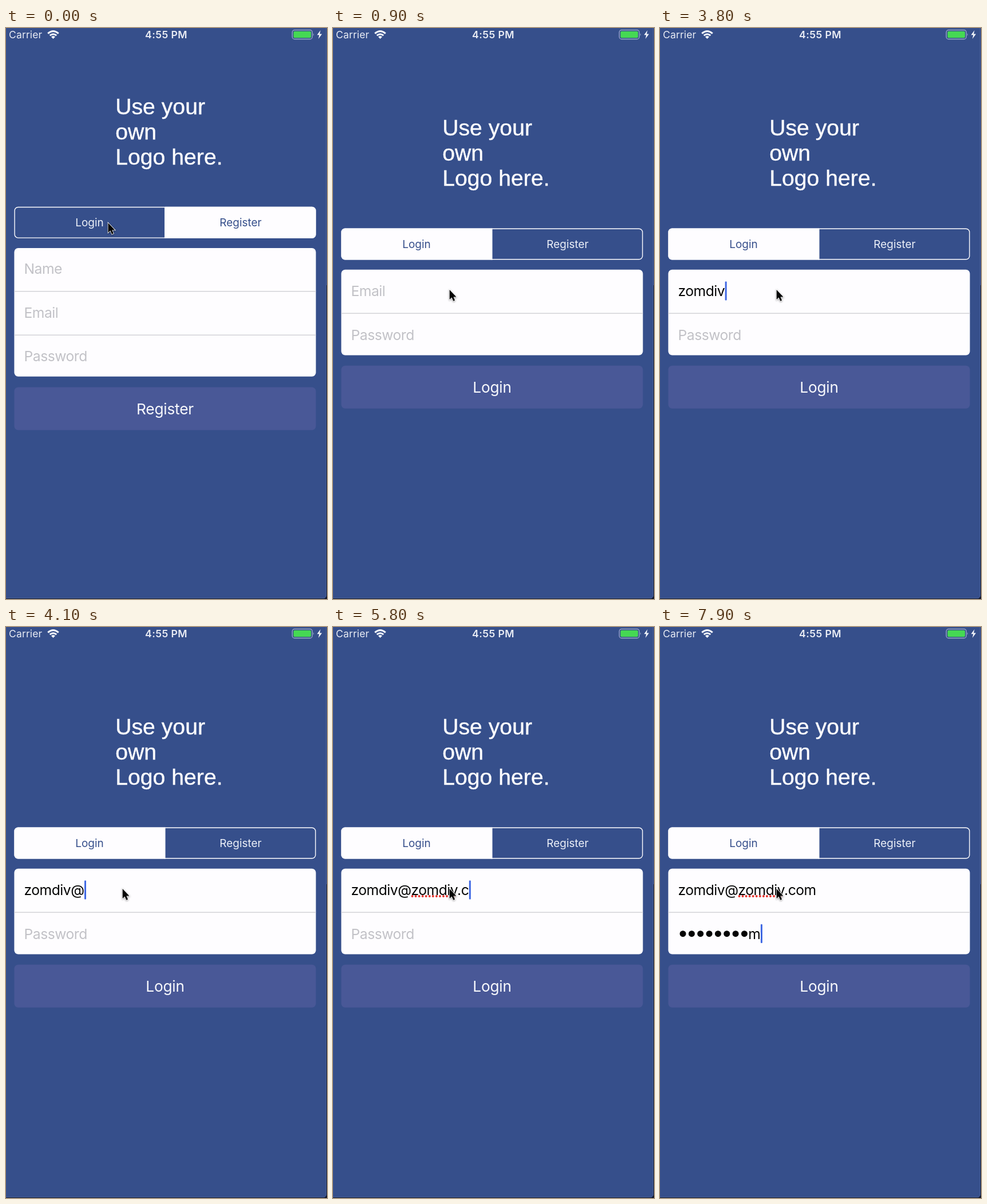
An HTML page that plays this animation: 561 by 999 pixels, repeating every 8000 ms.

```html
<!DOCTYPE html>
<html lang="en">
<head>
<meta charset="utf-8">
<title>Login form</title>
<style>
  html, body { margin: 0; width: 100%; height: 100%; overflow: hidden; background: #364f8b; }
  svg { display: block; width: 100%; height: 100%; }
  text { font-family: Inter, "Liberation Sans", sans-serif; white-space: pre; }
  .logo { font: 39.2px "Liberation Sans", Arial, sans-serif; fill: #fdfdff; stroke: #fdfdff; stroke-width: .4; }
  .bar { fill: #e9ecf4; }
  .seg { font-size: 19px; text-anchor: middle; }
  .field { font-size: 24.7px; letter-spacing: -.5px; fill: #c2c2c7; }
  .typed { fill: #050505; }
  .action { font-size: 26.3px; letter-spacing: -.25px; text-anchor: middle; fill: #f7f8fc; }
  .card { fill: #fefdff; }
  .rule { stroke: #d3d3d7; stroke-width: 1.6; }
  .button { fill: #495897; }
  .caret { fill: #4069e4; }
  .spell { stroke: #e5342f; stroke-width: 4; stroke-linecap: round; stroke-dasharray: 0 6.05; }
</style>
</head>
<body>
<svg viewBox="0 0 561 999">
  <defs>
    <clipPath id="round"><rect x="14.4" y="312.8" width="527.2" height="55" rx="6.5"/></clipPath>
  </defs>
  <rect width="561" height="999" fill="#364f8b"/>

  <!-- window edge -->
  <path d="M560.5 0V450" stroke="#2f4376"/>
  <path d="M560.5 450V999M0 998.5H561" stroke="#10172b"/>
  <path d="M559.5 0V992Q559.5 997.5 554 997.5H0" fill="none" stroke="#4a629a"/>
  <path d="M561 991V999H553Q560 998 561 991Z" fill="#10172b"/>

  <!-- status bar -->
  <text class="bar" x="5" y="18" font-size="17.5" letter-spacing=".15">Carrier</text>
  <g fill="none" stroke="#f4f6fb" stroke-width="3">
    <path d="M73.2 9.6Q82.5 1.4 91.8 9.6"/>
    <path d="M76.7 13.2Q82.5 8.3 88.3 13.2"/>
  </g>
  <path d="M79 15.4Q82.5 12.6 86 15.4L82.5 19Z" fill="#f4f6fb"/>
  <text class="bar" x="280" y="18" font-size="17.7" font-weight="600" letter-spacing=".4" text-anchor="middle">4:55 PM</text>
  <rect x="500.3" y="3.5" width="35" height="16" rx="4" fill="none" stroke="#98a6c8" stroke-width="1.3"/>
  <rect x="502.5" y="5.7" width="30.6" height="11.6" rx="2" fill="#45d853"/>
  <path d="M536.8 9Q539 11.5 536.8 14Z" fill="#98a6c8"/>
  <path d="M549.6 4L543.6 12.3H547.4L546 19L552.2 10.5H548.3Z" fill="#f4f6fb"/>

  <g id="top">
    <text class="logo" x="191.2" y="150.5">Use your</text>
    <text class="logo" x="191.2" y="194.5">own</text>
    <text class="logo" x="191.2" y="238.5">Logo here.</text>
    <g clip-path="url(#round)" fill="#fefdff">
      <rect id="loginFill" x="14" y="312" width="264" height="57"/>
      <rect id="registerFill" x="278" y="312" width="264" height="57"/>
    </g>
    <path d="M277.8 313V368" stroke="#fefdff" stroke-width="1.5"/>
    <rect x="15.1" y="313.5" width="525.8" height="53.6" rx="6" fill="none" stroke="#fefdff" stroke-width="1.4"/>
    <text id="loginTab" class="seg" x="146" y="347">Login</text>
    <text id="registerTab" class="seg" x="410" y="347">Register</text>
  </g>

  <g id="registerForm">
    <rect class="card" x="14.4" y="385" width="527.2" height="224.8" rx="7"/>
    <path class="rule" d="M14.4 460.8H541.6M14.4 537.3H541.6"/>
    <text class="field" x="31.5" y="430">Name</text>
    <text class="field" x="31.5" y="506.5">Email</text>
    <text class="field" x="31.5" y="583">Password</text>
    <rect class="button" x="14.4" y="628.5" width="527.2" height="75" rx="7"/>
    <text class="action" x="278" y="675.5">Register</text>
  </g>

  <g id="loginForm">
    <rect class="card" x="14.4" y="422.7" width="527.2" height="149.8" rx="7"/>
    <path class="rule" d="M14.4 499.3H541.6"/>
    <text id="email" class="field" x="31.5" y="469"></text>
    <path id="spell" class="spell"/>
    <g id="bullets"></g>
    <text id="password" class="field" y="545.5"></text>
    <rect id="caret" class="caret" width="3" height="33" rx="1"/>
    <rect class="button" x="14.4" y="590.7" width="527.2" height="75" rx="7"/>
    <text class="action" x="278" y="638">Login</text>
  </g>

  <path id="pointer" d="M0 0V17L3.9 13.5L6.6 19.8L9.4 18.6L6.8 12.5H11.8Z" fill="#050505" stroke="#fff" stroke-width="1.6"
        paint-order="stroke" style="filter: drop-shadow(0 1.5px 1.5px rgba(0,0,0,.4))"/>
</svg>

<script>
const LOOP = 8000, STEP = 100, LEFT = 31.5, PITCH = 15.35;
const SWITCH = 300, FOCUS = 1000, NEXT_FIELD = 6400, SPELL = 5500;
const MAIL_START = 7, MAIL_END = 13;
const $ = id => document.getElementById(id);

// [time, key]; '<' deletes one character
const emailKeys = [
  [1800, 'z'], [2000, 'o'], [2300, 'm'], [2600, 'i'], [2900, '<'], [3100, 'd'], [3300, 'i'],
  [3400, 'v'], [4000, '@'], [4300, 'z'], [4500, 'o'], [4700, 'm'], [4800, 'd'], [5000, 'i'],
  [5100, 'v'], [5500, '.'], [5800, 'c'], [6000, 'o'], [6100, 'm']
];
const passwordKeys = [
  [6700, 'z'], [6900, 'o'], [7000, 'm'], [7200, 'd'], [7300, 'i'], [7500, 'v'],
  [7800, 'z'], [7800, 'o'], [7900, 'm']
];

// [time, value] stops, joined by straight lines
const loginFade = [[0, 0], [200, .2], [300, .21], [600, 1]];
const loginInk = [[0, 0], [300, .4], [600, 1]];
const registerFade = [[200, 1], [300, .88], [600, 0]];

const typed = (keys, t) => keys.reduce((s, [at, k]) =>
  at > t ? s : k === '<' ? s.slice(0, -1) : s + k, '');

function track(stops, t) {
  const i = stops.findIndex(s => s[0] > t);
  if (i < 0) return stops[stops.length - 1][1];
  if (i === 0) return stops[0][1];
  const [t0, a] = stops[i - 1], [t1, b] = stops[i];
  return a + (b - a) * (t - t0) / (t1 - t0);
}

function smooth(t, from, to) {
  const p = Math.min(1, Math.max(0, (t - from) / (to - from)));
  return p * p * (3 - 2 * p);
}

// near white on the page colour, blue on a filled tab
const ink = p => `rgb(${[[236, 54], [240, 79], [248, 139]]
  .map(([a, b]) => Math.round(a + (b - a) * p)).join()})`;

const show = (id, on) => $(id).style.display = on ? '' : 'none';

function setField(id, text, hint) {
  $(id).textContent = text || hint;
  $(id).classList.toggle('typed', !!text);
}

function drawTabs(t) {
  $('loginFill').style.opacity = track(loginFade, t);
  $('registerFill').style.opacity = track(registerFade, t);
  $('loginTab').style.fill = ink(track(loginInk, t));
  $('registerTab').style.fill = ink(track(registerFade, t));
}

function drawFields(t) {
  const mail = typed(emailKeys, t), secret = typed(passwordKeys, t);
  const hidden = Math.max(0, secret.length - 1);
  const secretX = LEFT + hidden * PITCH;

  setField('email', mail, 'Email');
  setField('password', secret.slice(-1), 'Password');
  $('password').setAttribute('x', secretX);
  [...$('bullets').children].forEach((dot, i) => dot.style.display = i < hidden ? '' : 'none');

  show('spell', t >= SPELL);
  if (t >= SPELL) {
    const x = n => LEFT + $('email').getSubStringLength(0, n);
    $('spell').setAttribute('d', `M${x(MAIL_START) + 2} 471H${x(MAIL_END)}`);
  }

  const inMail = t < NEXT_FIELD;
  const x = inMail
    ? LEFT + (mail ? $('email').getComputedTextLength() : 0)
    : secretX + (secret ? $('password').getComputedTextLength() : 0);
  $('caret').setAttribute('x', x + .5);
  $('caret').setAttribute('y', inMail ? 443.5 : 520);
  show('caret', t >= FOCUS && !(t >= 1500 && t < 1800));
}

function render(time) {
  const t = Math.floor(time % LOOP / STEP) * STEP;
  const login = t >= SWITCH;
  show('registerForm', !login);
  show('loginForm', login);
  $('top').setAttribute('transform', `translate(0 ${login ? 37.7 : 0})`);
  drawTabs(t);
  if (login) drawFields(t);
  const p = smooth(t, 350, 900);
  $('pointer').setAttribute('transform', `translate(${178.5 + 25.2 * p} ${341 + 117 * p})`);
}

$('bullets').innerHTML = passwordKeys.map((_, i) =>
  `<circle cx="${40 + i * PITCH}" cy="536.7" r="5.5" fill="#050505"/>`).join('');

const start = performance.now();
(function frame() {
  render(performance.now() - start);
  requestAnimationFrame(frame);
})();
</script>
</body>
</html>
```
